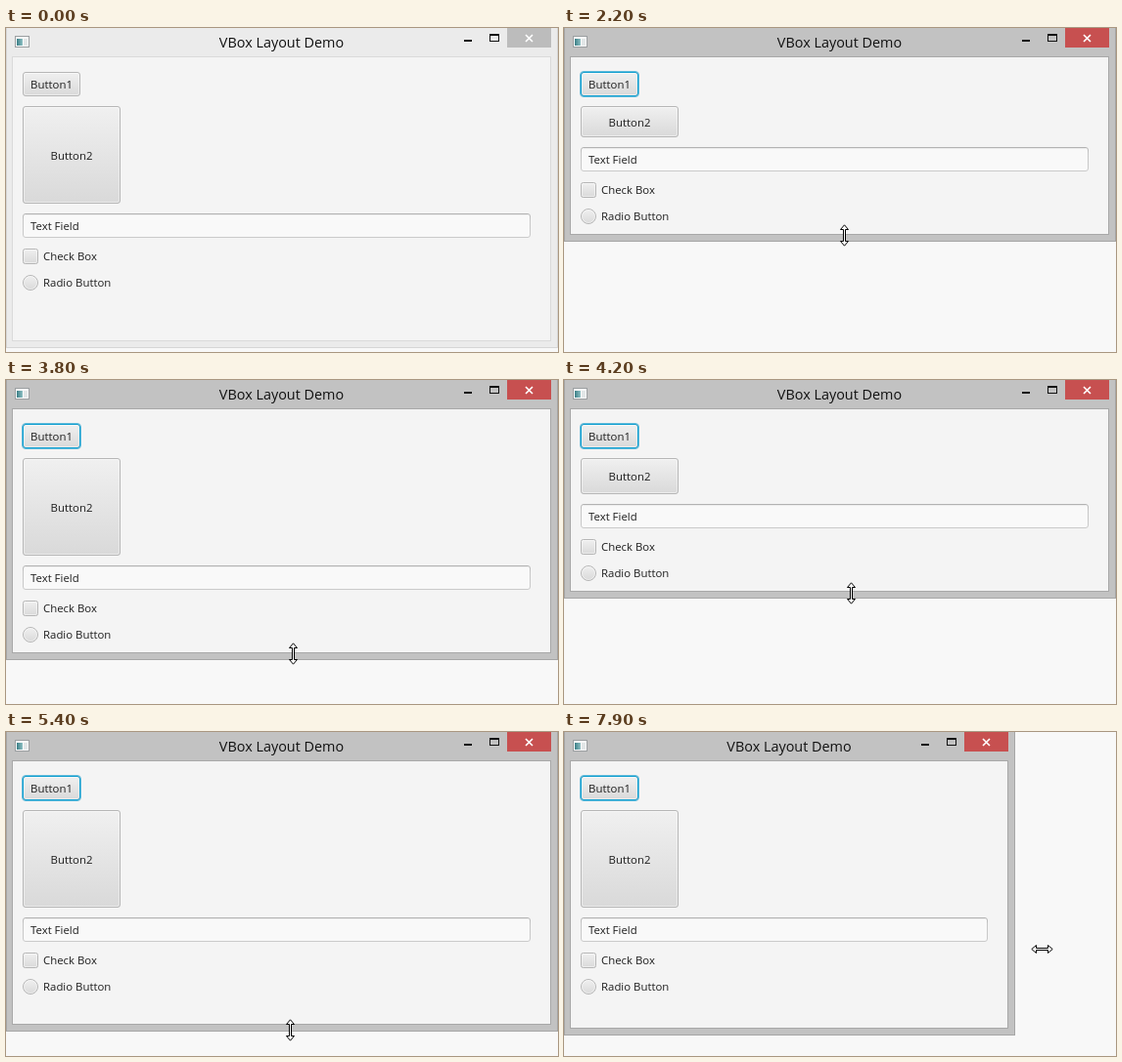
An HTML page that plays this animation: 564x332 px, repeating every 8 s.

```html
<!DOCTYPE html>
<html lang="en">
<head>
<meta charset="utf-8">
<title>VBox Layout Demo</title>
<style>
  html, body { margin: 0; width: 100%; height: 100%; overflow: hidden; background: #f8f8f8; }
  svg { display: block; width: 564px; height: 332px; }
  text { font: 11.4px "Open Sans", "Noto Sans", sans-serif; fill: #1e1e1e; }
  .title { font-size: 14.4px; fill: #111; text-anchor: middle; }
  .mid { text-anchor: middle; }
  .frame { fill: #ebebeb; stroke: #d6d6d6; }
  .pane { fill: #f4f4f4; stroke: #dadada; }
  .close { fill: #bcbcbc; }
  .active .frame { fill: #c2c2c2; stroke: #a6a6a6; }
  .active .pane { stroke: #a8a8a8; }
  .active .close { fill: #c75050; }
  .box { fill: url(#body); stroke: #b6b6b6; }
  .shine { fill: none; stroke: #fff; stroke-opacity: .45; }
  .ring { display: none; fill: none; stroke: #129fd0; }
  .halo { stroke: #62bcdc; }
  .active .ring { display: inline; }
  .cursor path { fill: #fff; stroke: #000; }
</style>
</head>
<body>
<svg viewBox="0 0 564 332">
  <defs>
    <linearGradient id="body" x2="0" y2="1">
      <stop offset="0" stop-color="#f0f0f0"/>
      <stop offset="1" stop-color="#d9d9d9"/>
    </linearGradient>
    <linearGradient id="edge" x2="0" y2="1">
      <stop offset="0" stop-color="#b2b2b2"/>
      <stop offset=".25" stop-color="#c6c6c6"/>
      <stop offset="1" stop-color="#cacaca"/>
    </linearGradient>
    <linearGradient id="teal">
      <stop offset="0" stop-color="#3a7f86"/>
      <stop offset="1" stop-color="#8fc0c4"/>
    </linearGradient>
  </defs>

  <g id="win">
    <rect id="frame" class="frame" x=".5" y="-1.5"/>
    <rect id="pane" class="pane" x="6.5" y="29.5"/>

    <rect x="9.5" y="8.5" width="14" height="11" fill="#fafafa" stroke="#9a9ea0"/>
    <rect x="11" y="11" width="6" height="7" fill="url(#teal)"/>
    <rect x="18" y="11" width="4" height="7" fill="#e2e6e7"/>
    <text id="title" class="title" x="281.5" y="20">VBox Layout Demo</text>

    <g id="controls">
      <path d="M468 12h8v2h-8z" fill="#111"/>
      <path d="M494 6h10v8h-10zM495 8v5h8v-5z" fill="#111" fill-rule="evenodd"/>
      <rect class="close" x="512" width="45" height="20"/>
      <path d="M531 7l7 7M538 7l-7 7" stroke="#fff" stroke-width="1.6"/>
    </g>

    <rect class="box" x="17.5" y="45.5" width="58" height="24" rx="2.5"/>
    <rect class="shine" x="18.5" y="46.5" width="56" height="22" rx="2"/>
    <rect class="ring halo" x="16.5" y="44.5" width="60" height="26" rx="3.5"/>
    <rect class="ring" x="17.5" y="45.5" width="58" height="24" rx="2.5"/>
    <text class="mid" x="46.5" y="62">Button1</text>

    <rect id="big" class="box" x="17.5" y="80.5" width="99" rx="2.5"/>
    <rect id="bigShine" class="shine" x="18.5" y="81.5" width="97" rx="2"/>
    <text id="bigText" class="mid" x="67" y="135">Button2</text>

    <g id="lower">
      <rect id="field" x="17.5" y="190.5" height="24" rx="2.5" fill="#f9f9f9" stroke="url(#edge)"/>
      <rect id="shade" x="19" y="191" height="1" fill="#ececec"/>
      <text x="25" y="207">Text Field</text>
      <rect class="box" x="17.5" y="226.5" width="15" height="15" rx="2"/>
      <rect class="shine" x="18.5" y="227.5" width="13" height="13" rx="1.5"/>
      <text x="38" y="238">Check Box</text>
      <circle class="box" cx="25" cy="261" r="7.5"/>
      <circle class="shine" cx="25" cy="261" r="6.5"/>
      <text x="38" y="265">Radio Button</text>
    </g>
  </g>

  <g id="cursor" class="cursor">
    <path id="arrow" d="M.5 .5V16.5L4.2 13L6.8 18.5L9 17.5L6.5 12H11.5Z"/>
    <path id="sizer" d="M0-10.7L4-6H1V6H4L0 10.7L-4 6H-1V-6H-4Z"/>
  </g>
</svg>
<script>
const LOOP = 8000, STEP = 100;
const WIDTH = 564, TOP_HEIGHT = 328, LOW = 210, HIGH = 308;
const LEAD = 30; // ms the pointer runs ahead of the dragged edge

const $ = id => document.getElementById(id);
const set = (id, attrs) => {
  for (const k in attrs) $(id).setAttribute(k, attrs[k]);
};
const shift = (id, x, y) => set(id, { transform: `translate(${x} ${y})` });

const clamp = (v, lo, hi) => Math.max(lo, Math.min(hi, v));
const part = (t, a, b) => clamp((t - a) / (b - a), 0, 1);
const mix = (a, b, p) => a + (b - a) * p;
const smooth = p => p * p * (3 - 2 * p);

// Each drag: start, end, size reached, bias (above 1 starts slowly)
const heightDrags = [
  [1600, 2300, LOW, 1.2],
  [2500, 3400, HIGH, 1.28],
  [3500, 4400, LOW, 1.1],
  [4500, 5400, HIGH - 1, 0.78],
  [5500, 5700, 311, 1]
];
const widthDrags = [
  [6900, 7600, 360, 1],
  [7700, 8100, 610, 1.2]
];

const sizeAt = (drags, size, t) => drags.reduce(
  (v, [a, b, to, bias]) => mix(v, to, smooth(part(t, a, b) ** bias)), size);
const heightAt = t => sizeAt(heightDrags, TOP_HEIGHT, t);
const widthAt = t => sizeAt(widthDrags, WIDTH, t);

const bezier = (a, b, c, d, p) => {
  const q = 1 - p;
  return q * q * q * a + 3 * q * q * p * b + 3 * q * p * p * c + p * p * p * d;
};

function pointerAt(t) {
  if (t < 1300) {
    const p = part(t, 200, 1000);
    return {
      kind: 'arrow',
      x: bezier(554, 330, 90, 286, p),
      y: bezier(42, -9, 100, 285, p) + 40 * part(t, 1000, 1300)
    };
  }
  if (t < 5900) {
    const sway = Math.cos(2 * Math.PI * (t - 4300) / 5400);
    return { kind: 'ns', x: 289.5 + 4.5 * sway, y: heightAt(t + LEAD) - 2 };
  }
  if (t < 6700) {
    const p = smooth(part(t, 5800, 6700));
    return { kind: 'arrow', x: mix(291, 560, p), y: mix(303, 228, p) };
  }
  return {
    kind: 'ew',
    x: widthAt(t + LEAD) - 2,
    y: mix(232, 222, part(t, 6800, 7900))
  };
}

function layout(w, b) {
  const h = clamp(b - 187, 25, 100);
  set('frame', { width: w - 1, height: b + 1 });
  set('pane', { width: w - 14, height: b - 37 });
  set('big', { height: h - 1 });
  set('bigShine', { height: h - 3 });
  set('field', { width: w - 46 });
  set('shade', { width: w - 49 });
  shift('title', (w - WIDTH) / 2, 0);
  shift('controls', w - WIDTH, 0);
  shift('bigText', 0, Math.floor((h - 100) / 2));
  shift('lower', 0, h - 100);
}

function point({ kind, x, y }) {
  const arrow = kind === 'arrow';
  const snap = v => Math.floor(v) + (arrow ? 0 : 0.5);
  const turn = kind === 'ew' ? 90 : 0;
  set('cursor', { transform: `translate(${snap(x)} ${snap(y)}) rotate(${turn})` });
  $('arrow').style.display = arrow ? '' : 'none';
  $('sizer').style.display = arrow ? 'none' : '';
}

function draw(t) {
  $('win').setAttribute('class', t >= 1600 ? 'active' : '');
  $('cursor').style.display = t < 200 ? 'none' : '';
  layout(Math.round(widthAt(t)), Math.round(heightAt(t)));
  point(pointerAt(t));
}

function tick() {
  const t = performance.now() % LOOP;
  draw(Math.floor(t / STEP) * STEP);
  requestAnimationFrame(tick);
}
tick();
</script>
</body>
</html>
```
